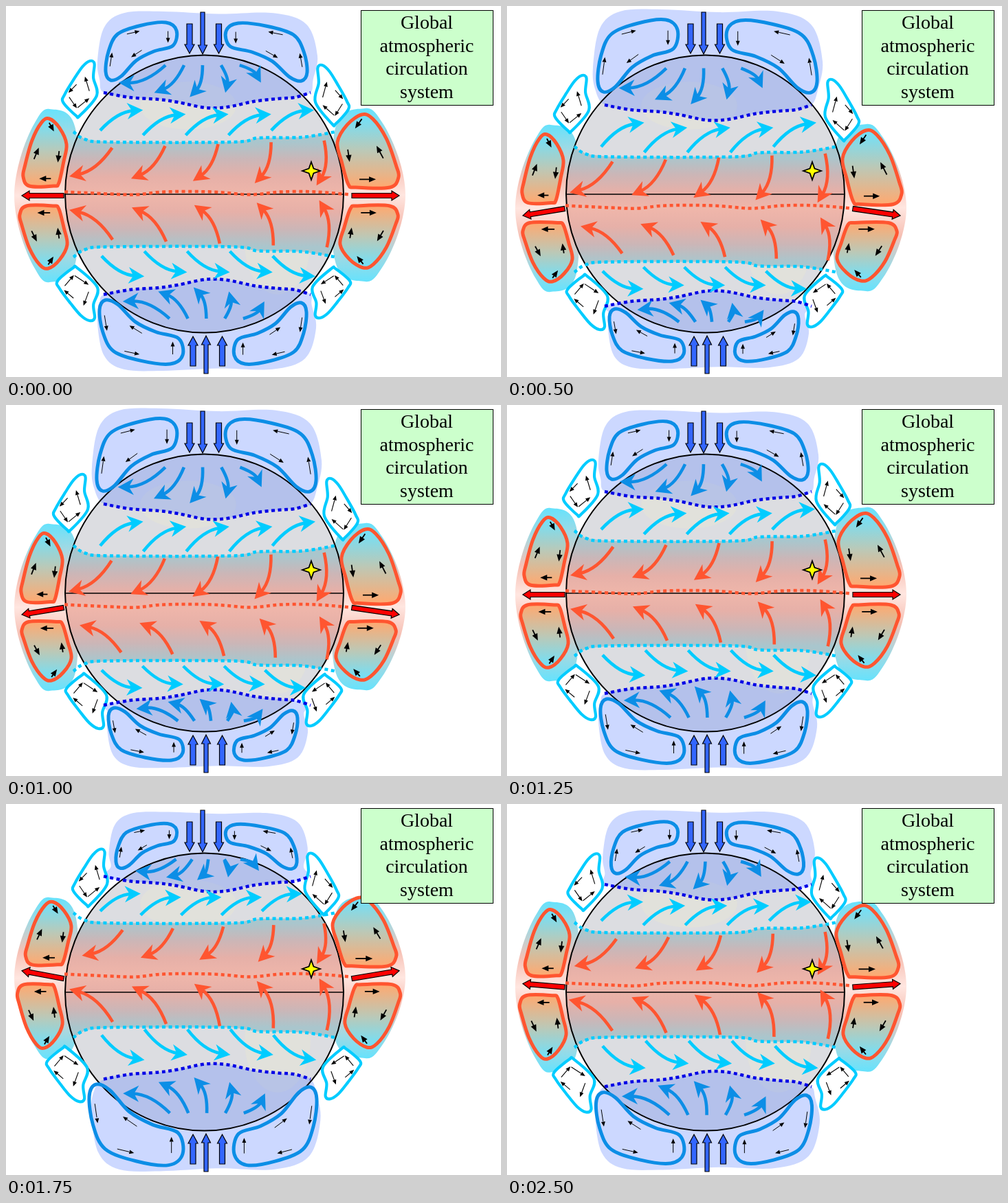
An HTML page with a canvas for the animation above (2.75 s loop, 720x540 px).

```html
<!DOCTYPE html>
<html lang="en">
<head>
<meta charset="utf-8">
<title>Global atmospheric circulation system</title>
<style>
  html, body { margin: 0; width: 720px; height: 540px; overflow: hidden; background: #fff; }
  canvas { position: absolute; left: 0; top: 0; }
  #label {
    position: absolute; left: 516px; top: 6px; width: 193px; height: 139px;
    box-sizing: border-box; padding-right: 1px; border: 1px solid #000; background: #cfc;
    font: 28px/33.7px "Liberation Serif", Times, serif; text-align: center;
  }
</style>
</head>
<body>
<canvas id="stage" width="720" height="540"></canvas>
<div id="label">Global<br>atmospheric<br>circulation<br>system</div>
<script>
const ctx = document.getElementById('stage').getContext('2d');
const BLUE = '#0c8ee6', CYAN = '#00ccff', RED = '#ff5530', NAVY = '#0000e6';

// Season s: 0 equinox, positive pushes every zone south, negative north
const STEP = 250;
const SEASONS = [0, .5, 1, 1.4, 1, 0, -.5, -1.15, -1.5, -1.15, -.5];

const pairs = s => s.trim().split(/\s+/).map(Number)
  .reduce((r, v, i, a) => (i % 2 ? [...r, [a[i - 1], v]] : r), []);

// Boxes are [outer x, poleward y, inner x, equatorward y]; swapped edges mirror the content.
// Each edge drifts by lin * s + quad * s^2, mirrored in the same way.
function place(box, { lin, quad }, s) {
  const side = Math.sign(box[2] - box[0]), hemi = Math.sign(box[3] - box[1]), h = s * hemi;
  return box.map((v, i) => v + (i % 2 ? hemi : side) * (lin[i] * h + quad[i] * h * h));
}

const into = box => ([u, v]) => [box[0] + u * (box[2] - box[0]), box[1] + v * (box[3] - box[1])];

// Outlines and arrows in unit coordinates of their box
const CELLS = [
  {
    color: BLUE, width: 5, line: 1, head: 7,
    lin: [-13, -4, 0, 15], quad: [0, 0, 0, 2],
    outline: pairs('0 .85 .04 .5 .17 .2 .5 .05 .85 0 1 .14 .95 .4 .68 .5 .43 .66 .22 .93 .07 1'),
    arrows: pairs('.06 .76 .09 .52 .3 .2 .48 .15 .88 .15 .88 .35 .51 .48 .36 .6'),
    boxes: [[145, 24, 248, 108], [438, 25, 320, 109], [136, 521, 257, 428], [437, 521, 332, 432]]
  },
  {
    color: CYAN, width: 4.2, fill: ['#fff', '#fff'], line: 1.1, head: 7,
    lin: [-13, 17, -13, 17], quad: [0, 4, 0, 5],
    outline: pairs('.8 0 .93 .05 .9 .3 1 .62 .5 .98 .38 .98 0 .74 .05 .6 .33 .32 .58 .1'),
    arrows: pairs('.4 .42 .16 .57 .18 .65 .41 .85 .43 .84 .78 .67 .78 .54 .65 .28'),
    boxes: [[83, 80, 132, 161], [498, 86, 450, 173], [75, 458, 133, 380], [500, 454, 446, 381]]
  },
  {
    color: RED, width: 5, fill: ['#6ce2fd', '#bcc8b6', '#ffa970'], line: 1.8, head: 10,
    lin: [-3, 21, -6, 24.5], quad: [0, 2, 0, 0],
    outline: pairs('.6 0 .84 .14 1 .38 .93 .65 .82 .96 .7 1 .14 1 0 .86 .04 .7 .2 .33 .42 .06'),
    arrows: pairs('.6 .06 .71 .19 .25 .6 .36 .43 .83 .48 .8 .65 .64 .89 .37 .89'),
    boxes: [[25, 164, 88, 262], [571, 158, 482, 264], [20, 382, 89, 291], [570, 381, 486, 291]]
  }
];

const BULGE = {
  lin: [0, 18, 0, 20], quad: [0, 5, 0, -6],
  outline: pairs('.57 0 .33 .08 .1 .28 0 .5 .1 .72 .33 .92 .57 1 1 .87 1 .13'),
  boxes: [[12, 150, 102, 402], [581, 149, 478, 401]]
};
const CAP = {
  lin: [-11, -3, 9, 17], quad: [3, 0, -3, 0],
  outline: pairs('.01 .85 0 .62 .03 .2 .12 .02 .3 0 .55 .03 .8 .02 .95 .16 1 .55 .98 .85'),
  boxes: [[133, 8, 453, 125], [133, 531, 451, 418]]
};

// Five arrows per wind row; from and to give unit positions
const edge = i => Math.abs(i - 2) === 2 ? 1 : 0;
const WINDS = [
  {
    color: BLUE, lin: [-10, 4, 2, 15], quad: [9, 0, -1, -4],
    from: i => [.3 + .13 * i, .06],
    to: i => [.25 * i - .03, .55 + .4 * Math.sin(i * Math.PI / 4)],
    boxes: [[170, 83, 377, 135], [176, 458, 382, 407]]
  },
  {
    color: CYAN, lin: [0, 18, 8, 24], quad: [0, 0, -6, 1],
    from: i => [.2 * i, 1 - .18 * edge(i)],
    to: i => [.2 + .2 * i, .2 - .16 * edge(i)],
    boxes: [[137, 150, 448, 188], [139, 395, 450, 357]]
  },
  {
    color: RED, lin: [-8, 19, 0, 25], quad: [7, 0, 0, 0],
    from: i => [.17 + .21 * i, .17 - .04 * i],
    to: i => [.245 * i, .79 + .05 * i],
    boxes: [[92, 195, 459, 262], [92, 352, 463, 282]]
  }
];

// Dotted lines: height at equinox, drift, hemisphere, profile
const FRONT = pairs('142 -10 180 -3 222 0 250 4 290 12 322 11 360 3 395 -1 420 -3 443 -10');
const EDGE = pairs('98 -14 115 -3 150 1 330 1 367 -5 430 -6 480 -14');
const ITCZ = pairs('85 0 150 3 190 4 230 0 300 0 355 4 400 0 450 0 500 4');
const LINES = [
  { color: NAVY, y: 136, drift: 18, hemi: 1, profile: FRONT },
  { color: CYAN, y: 197, drift: 21.5, hemi: 1, profile: EDGE },
  { color: RED, y: 270.5, drift: 20, hemi: 1, profile: ITCZ },
  { color: CYAN, y: 351.5, drift: 22, hemi: -1, profile: EDGE },
  { color: NAVY, y: 410, drift: 17, hemi: -1, profile: FRONT }
];
const linePoints = (l, s) => l.profile.map(([x, dy]) => [x, l.y + l.drift * s + l.hemi * dy]);

function spline(pts, closed) {
  const n = pts.length;
  const at = i => closed ? pts[(i + n) % n] : pts[Math.max(0, Math.min(n - 1, i))];
  ctx.beginPath();
  ctx.moveTo(...pts[0]);
  for (let i = 0; i < (closed ? n : n - 1); i++) {
    const [a, b, c, d] = [at(i - 1), at(i), at(i + 1), at(i + 2)];
    ctx.bezierCurveTo(b[0] + (c[0] - a[0]) / 6, b[1] + (c[1] - a[1]) / 6,
      c[0] - (d[0] - b[0]) / 6, c[1] - (d[1] - b[1]) / 6, c[0], c[1]);
  }
  if (closed) ctx.closePath();
}

function polygon(pts) {
  ctx.beginPath();
  pts.forEach(p => ctx.lineTo(...p));
  ctx.closePath();
}

function paint(fill, stroke, width) {
  if (fill) { ctx.fillStyle = fill; ctx.fill(); }
  if (stroke) { ctx.strokeStyle = stroke; ctx.lineWidth = width; ctx.stroke(); }
}

function vertical(y0, y1, colors) {
  const g = ctx.createLinearGradient(0, y0, 0, y1);
  colors.forEach((c, i) => g.addColorStop(i / (colors.length - 1), c));
  return g;
}
const symmetric = colors => [...colors, ...colors.slice(0, -1).reverse()];

// Polygon in a frame with its origin at b, pointing from a to b
function along(a, b, pts) {
  const t = Math.atan2(b[1] - a[1], b[0] - a[0]), c = Math.cos(t), s = Math.sin(t);
  polygon(pts.map(([x, y]) => [b[0] + x * c - y * s, b[1] + x * s + y * c]));
}

function thinArrow(a, b, width, head) {
  ctx.beginPath();
  ctx.moveTo(...a);
  ctx.lineTo(b[0] + (a[0] - b[0]) * .3, b[1] + (a[1] - b[1]) * .3);
  paint(null, '#000', width);
  along(a, b, [[0, 0], [-head, -head * .42], [-head, head * .42]]);
  paint('#000');
}

function blockArrow(a, b, fill, shaft, wide, head) {
  const len = Math.hypot(b[0] - a[0], b[1] - a[1]), s = shaft / 2, w = wide / 2;
  along(a, b, [[0, 0], [-head, -w], [-head, -s], [-len, -s], [-len, s], [-head, s], [-head, w]]);
  paint(fill, '#000', 1.2);
}

function windArrow(a, b, bend, color) {
  const dx = b[0] - a[0], dy = b[1] - a[1];
  const c = [(a[0] + b[0]) / 2 - dy * bend, (a[1] + b[1]) / 2 + dx * bend];
  const k = 14 / Math.hypot(b[0] - c[0], b[1] - c[1]);
  ctx.beginPath();
  ctx.moveTo(...a);
  ctx.quadraticCurveTo(...c, b[0] - (b[0] - c[0]) * k, b[1] - (b[1] - c[1]) * k);
  paint(null, color, 4.6);
  along(c, b, [[0, 0], [-23, -12], [-16, 0], [-23, 12]]);
  paint(color);
}

function ellipse(x, y, rx, ry) {
  ctx.beginPath();
  ctx.ellipse(x, y, rx, ry, 0, 0, 2 * Math.PI);
}
const globe = () => ellipse(288.5, 273.5, 202.5, 202);

function drawBulge(base, s) {
  const box = place(base, BULGE, s);
  spline(BULGE.outline.map(into(box)), true);
  paint(vertical(box[1], box[3], symmetric(['#66e2fc', '#a8d8e0', '#f6c0b4', '#ffe6e0'])));
}

function drawGlobe(s) {
  globe();
  paint('#dcdde1');
  for (const land of [[265, 145, 70, 35], [395, 345, 48, 75]]) {
    ellipse(...land);
    paint('rgba(236,232,205,.3)');
  }
  const top = linePoints(LINES[1], s), low = linePoints(LINES[3], s);
  ctx.save();
  globe();
  ctx.clip();
  polygon([[70, top[0][1]], ...top, [510, top[6][1]], [510, low[6][1]], ...low.reverse(), [70, low[6][1]]]);
  paint(vertical(top[3][1], low[3][1], symmetric(['#a9c6cd', '#cbb6b7', '#e6b0a8', '#efb6aa'])));
  ctx.restore();
}

function drawCap(base, front, s) {
  spline([...CAP.outline.map(into(place(base, CAP, s))), ...linePoints(front, s).reverse()], true);
  paint('rgba(90,130,255,.31)');
}

function drawCells(kind, s) {
  for (const base of kind.boxes) {
    const box = place(base, kind, s), a = kind.arrows.map(into(box));
    spline(kind.outline.map(into(box)), true);
    paint(kind.fill && vertical(box[1], box[3], kind.fill), kind.color, kind.width);
    for (let i = 0; i < a.length; i += 2) thinArrow(a[i], a[i + 1], kind.line, kind.head);
  }
}

function drawWinds(row, s) {
  row.boxes.forEach((base, south) => {
    const put = into(place(base, row, s));
    for (let i = 0; i < 5; i++)
      windArrow(put(row.from(i)), put(row.to(i)), south ? .2 : -.2, row.color);
  });
}

function drawBlockArrows(s) {
  for (const [x0, x1] of [[84, 23], [503, 572]])
    blockArrow([x0, 276 + 19 * s], [x1, 276 + 29 * s], '#ff0000', 7, 14, 11);
  for (const [x, mid, dir] of [[286, 70, 1], [291, 480, -1]]) {
    blockArrow([x, mid - 61 * dir + (dir < 0 ? -6 : 0)], [x, mid], '#3366ff', 6, 13, 13);
    for (const dx of [-19, 23.5])
      blockArrow([x + dx, mid - 44 * dir], [x + dx, mid - dir], '#3366ff', 8, 14, 13);
  }
}

function drawStar(x, y) {
  polygon([...Array(8).keys()].map(i => {
    const r = i % 2 ? 4.8 : 13, t = i * Math.PI / 4;
    return [x + r * Math.sin(t), y - r * Math.cos(t)];
  }));
  paint('#ffff00', '#000', 1.8);
}

function draw(s) {
  ctx.clearRect(0, 0, 720, 540);
  BULGE.boxes.forEach(box => drawBulge(box, s));
  drawGlobe(s);
  drawCap(CAP.boxes[0], LINES[0], s);
  drawCap(CAP.boxes[1], LINES[4], s);
  globe();
  paint(null, '#000', 2);
  ctx.beginPath();
  ctx.moveTo(86, 274);
  ctx.lineTo(491, 274);
  paint(null, '#000', 1.6);

  CELLS.forEach(kind => drawCells(kind, s));
  ctx.setLineDash([5, 4.5]);
  LINES.forEach(l => { spline(linePoints(l, s)); paint(null, l.color, 4.5); });
  ctx.setLineDash([]);
  WINDS.forEach(row => drawWinds(row, s));
  drawBlockArrows(s);
  drawStar(444, 240);
}

let shown = -1;
function tick() {
  const step = Math.floor((performance.now() - start) / STEP) % SEASONS.length;
  if (step !== shown) draw(SEASONS[shown = step]);
  requestAnimationFrame(tick);
}
const start = performance.now();
tick();
</script>
</body>
</html>
```
